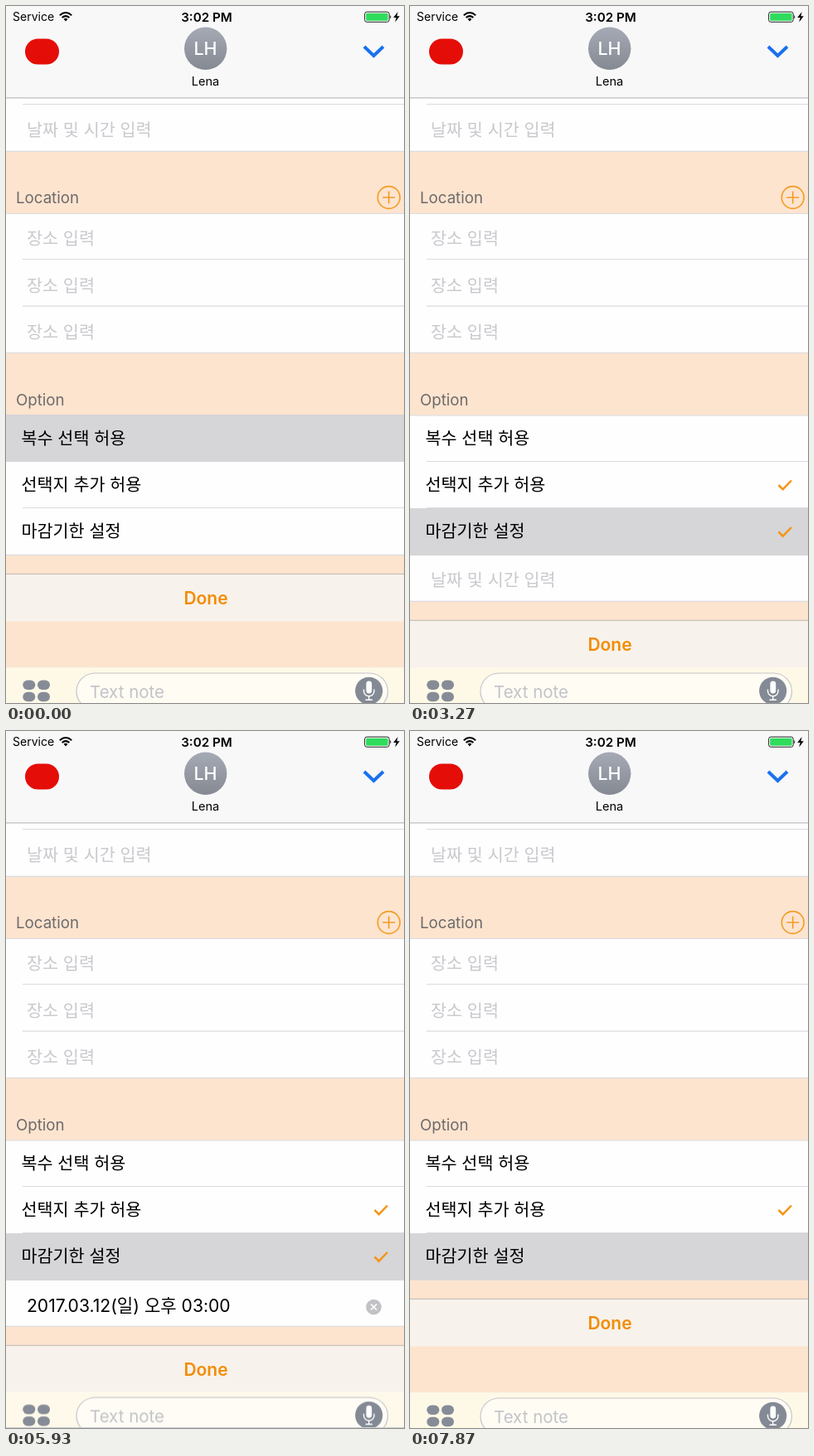
These frames come from a looping animation (480x841 px, 8 s). An HTML page:

```html
<!DOCTYPE html>
<html lang="ko">
<head>
<meta charset="utf-8">
<title>Poll options</title>
<style>
html, body { margin: 0; width: 100%; height: 100%; overflow: hidden; background: #fff; }
#stage { position: relative; width: 480px; height: 841px; overflow: hidden; }
svg { position: absolute; left: 0; top: 0; }
text, #picker { font-family: Inter, "Noto Sans CJK KR", sans-serif; }
.ko { font: 20.7px "Noto Sans CJK KR", "Noto Sans CJK JP", sans-serif; }
.hint { fill: #c9c9ce; }
.head { font-size: 18.7px; fill: #6d6a6a; }
.mid { text-anchor: middle; }
.line { stroke: #dbdbdf; stroke-width: 1.2; }
.check { fill: none; stroke: #f59516; stroke-width: 2.5; }

/* Table states */
#pick { animation: pick 8s step-end infinite; }
@keyframes pick {
  0% { transform: translateY(0); }
  3.75% { transform: translateY(56.5px); }
  16.625%, 100% { transform: translateY(112.5px); }
}
#check2 { animation: check2 8s step-end infinite; }
@keyframes check2 { 0% { opacity: 0; } 3.75%, 100% { opacity: 1; } }
#check3 { animation: check3 8s step-end infinite; }
@keyframes check3 { 0% { opacity: 0; } 16.625% { opacity: 1; } 87.5%, 100% { opacity: 0; } }
#empty { animation: empty 8s step-end infinite; }
@keyframes empty { 0% { opacity: 1; } 68.75%, 100% { opacity: 0; } }
#filled { animation: filled 8s step-end infinite; }
@keyframes filled { 0% { opacity: 0; } 68.75%, 100% { opacity: 1; } }
#tail { animation: tail 8s ease-in-out infinite; }
@keyframes tail {
  0%, 16.625% { transform: translateY(0); }
  20.375%, 87.5% { transform: translateY(56px); }
  91.25%, 100% { transform: translateY(0); }
}

/* Message bar and date picker */
#bar { animation: bar 8s cubic-bezier(.2,.8,.2,1) infinite; }
@keyframes bar {
  0%, 49.375% { transform: translateY(307px); }
  51.25%, 68.75% { transform: translateY(0); }
  75%, 100% { transform: translateY(307px); }
}
#cream { animation: cream 8s linear infinite; }
@keyframes cream { 0%, 49.375% { opacity: 1; } 51.25%, 68.75% { opacity: 0; } 75%, 100% { opacity: 1; } }
#picker {
  position: absolute; left: 0; top: 547px; width: 480px; height: 294px; color: #202124;
  background: linear-gradient(#cdd0d2, #d0d3d8 45%, #d2d4d6 75%, #d4d5c9);
  animation: rise 8s cubic-bezier(.2,.8,.2,1) infinite;
}
@keyframes rise {
  0%, 49.375% { transform: translateY(294px); }
  55.625%, 68.75% { transform: translateY(0); }
  75%, 100% { transform: translateY(294px); }
}
#done { position: absolute; left: 390px; top: 19px; font-size: 21.5px; line-height: 28px; color: #000; }
#wheel {
  position: absolute; top: 72px; width: 480px; height: 216px; perspective: 1666px;
  -webkit-mask: linear-gradient(#0005, #000b 40px, #000 85px, #0000 85px 131px, #000 131px, #000b 176px, #0005);
  mask: linear-gradient(#0005, #000b 40px, #000 85px, #0000 85px 131px, #000 131px, #000b 176px, #0005);
}
.drum { position: absolute; left: 0; top: 86px; width: 480px; height: 44px; transform-style: preserve-3d; transform: translateZ(-106.5px); }
.row { position: absolute; left: 0; height: 44px; line-height: 44px; text-align: right; white-space: pre; box-sizing: border-box; }
.drum .row { color: #85878b; backface-visibility: hidden; }
#band { position: absolute; top: 157px; width: 480px; height: 46px; overflow: hidden; box-sizing: border-box; border: solid #b3b5ba; border-width: 1.2px 0; }
.strip { position: absolute; left: 0; top: 0; width: 480px; height: 44px; }
.drum.date { animation: spin 8s cubic-bezier(.3,.2,.2,1) infinite; }
@keyframes spin {
  0%, 57.5% { transform: translateZ(-106.5px) rotateX(0deg); }
  62.5%, 100% { transform: translateZ(-106.5px) rotateX(-22.3deg); }
}
.strip.date { animation: slide 8s cubic-bezier(.3,.2,.2,1) infinite; }
@keyframes slide { 0%, 57.5% { transform: translateY(0); } 62.5%, 100% { transform: translateY(45px); } }
</style>
</head>
<body>
<div id="stage">
<svg width="480" height="841" viewBox="0 0 480 841">
  <rect width="480" height="841" fill="#fde4cf"/>

  <!-- Date and location -->
  <path d="M0 110H480V175H0zM0 250H480V418H0zM0 494H480V719H0z" fill="#fefefe"/>
  <path class="line" d="M20 118.5H480M0 175.3H480M0 250.5H480M20 305.5H480M20 362.2H480M0 418.5H480M0 494H480M20 549.5H480M20 605.5H480"/>
  <text class="ko hint" x="25" y="157">날짜 및 시간 입력</text>
  <text class="head" x="12" y="238">Location</text>
  <g fill="none" stroke="#f39b22" stroke-width="1.6">
    <circle cx="461.7" cy="231" r="13.4"/><path d="M454.2 231H469.2M461.7 223.5V238.5"/>
  </g>
  <text class="ko hint" x="25" y="288">장소 입력</text>
  <text class="ko hint" x="25" y="344.5">장소 입력</text>
  <text class="ko hint" x="25" y="400.5">장소 입력</text>

  <!-- Options -->
  <text class="head" x="12" y="481.5">Option</text>
  <rect id="pick" y="493" width="480" height="57" fill="#d6d5d8"/>
  <text class="ko" x="18.5" y="528.5">복수 선택 허용</text>
  <text class="ko" x="18.5" y="584.5">선택지 추가 허용</text>
  <text class="ko" x="18.5" y="641">마감기한 설정</text>
  <path id="check2" class="check" d="M444.5 578L449.7 583.2L460 572.5"/>
  <path id="check3" class="check" d="M444.5 634.5L449.7 639.7L460 629"/>
  <text id="empty" class="ko hint" x="25" y="700">날짜 및 시간 입력</text>
  <g id="filled">
    <text x="25" y="701" font-size="21.1">2017.03.12(일) 오후 03:00</text>
    <circle cx="443.5" cy="695" r="9.3" fill="#c2c2c6"/>
    <path d="M440 691.5l7 7m0-7l-7 7" stroke="#fff" stroke-width="1.7"/>
  </g>
  <g id="tail">
    <rect y="662" width="480" height="180" fill="#fde4cf"/>
    <path class="line" d="M0 662.3H480"/>
    <rect y="685" width="480" height="57.5" fill="#f7f2eb"/>
    <path d="M0 685.3H480" stroke="#c9c1ba" stroke-width="1.2"/>
    <text class="mid" x="241" y="722" font-size="21" font-weight="600" fill="#f28c05">Done</text>
  </g>

  <!-- Header -->
  <rect width="480" height="110.5" fill="#f8f8f9"/>
  <path d="M0 110.8H480" stroke="#bdbdc0" stroke-width="1.3"/>
  <text x="8" y="18.3" font-size="14">Service</text>
  <g fill="none" stroke="#000" stroke-width="2">
    <path d="M64.8 11.2Q72 4.8 79.2 11.2M67.6 14Q72 10.2 76.4 14"/>
  </g>
  <path d="M69.6 15.8Q72 13.8 74.4 15.8L72 18.4z"/>
  <text class="mid" x="242" y="18.5" font-size="15.2" font-weight="600">3:02 PM</text>
  <rect x="432.6" y="7.1" width="29.6" height="12.2" rx="2.6" fill="none" stroke="#222"/>
  <rect x="434.2" y="8.7" width="26.4" height="9" rx="1.2" fill="#2fdc5c"/>
  <path d="M463.3 11Q465.3 13.2 463.3 15.4z"/>
  <path d="M472.6 7L467.2 14H470.6L469.2 19.6L474.8 12.2H471.4z"/>
  <rect x="23" y="39.5" width="41" height="31" rx="15.5" fill="#e50d08"/>
  <linearGradient id="shade" x2="0" y2="1"><stop stop-color="#a5aab5"/><stop offset="1" stop-color="#858992"/></linearGradient>
  <circle cx="240.7" cy="51.3" r="25.7" fill="url(#shade)"/>
  <text class="mid" x="240.5" y="59" font-size="21.5" font-weight="500" fill="#fff">LH</text>
  <text class="mid" x="240.5" y="95.5" font-size="14.6">Lena</text>
  <path d="M432 49L443.5 60L455 49" fill="none" stroke="#1a70f0" stroke-width="4"/>

  <!-- Message bar -->
  <g id="bar">
    <rect y="491.5" width="480" height="57.5" fill="#fefefe"/>
    <rect id="cream" y="491.5" width="480" height="57.5" fill="#fef9e7"/>
    <g fill="#868c97">
      <rect x="20.3" y="506.5" width="15" height="11.4" rx="5.7"/><rect x="38" y="506.5" width="15" height="11.4" rx="5.7"/>
      <rect x="20.3" y="520.8" width="15" height="11.4" rx="5.7"/><rect x="38" y="520.8" width="15" height="11.4" rx="5.7"/>
    </g>
    <rect x="85" y="498" width="375.5" height="44" rx="22" fill="#fff" fill-opacity=".55" stroke="#c4c4ca" stroke-width="1.2"/>
    <text x="101" y="528" font-size="20.5" fill="#c3c3c8">Text note</text>
    <circle cx="437.7" cy="519.3" r="16.6" fill="#848a95"/>
    <rect x="434.4" y="507.5" width="6.8" height="15" rx="3.4" fill="#fff"/>
    <path d="M431.5 517.5V519.5A6.2 6.2 0 0 0 444 519.5V517.5M437.7 526V530M433.5 530.3H442" fill="none" stroke="#fff" stroke-width="1.4"/>
  </g>
</svg>

<div id="picker">
  <div id="done">Done</div>
  <div id="wheel"></div>
  <div id="band"></div>
</div>
</div>
<script>
const STEP = 22.3, RADIUS = 106.5, PITCH = 45;
const TODAY = '오늘';
const dates = ['8일 수', '9일 목', '10일 금', '11일 토', '12일 일', '', '14일 화', '15일 수', '16일 목']
  .map(d => d ? '3월 ' + d : TODAY);

// right and size: [on the drum, in the selection band]
const columns = [
  { name: 'date', items: dates, selected: 5, right: [223, 216], size: [25, 29] },
  { name: 'half', items: ['오전', '오후'], selected: 1, right: [284, 288], size: [25, 29] },
  { name: 'hour', items: [12, 1, 2, 3, 4, 5, 6], selected: 3, right: [338, 341], size: [26, 30] },
  { name: 'minute', items: [45, 50, 55, '00', '05', 10, 15], selected: 3, right: [417, 420], size: [26, 30] }
];

function add(parent, className, text = '') {
  const el = document.createElement('div');
  el.className = className;
  el.textContent = text;
  return parent.appendChild(el);
}

function fill(parent, kind, col, side) {
  const list = add(parent, kind + ' ' + col.name);
  col.items.forEach((item, n) => {
    const i = n - col.selected;
    const row = add(list, 'row', item);
    row.style.width = col.right[side] + 'px';
    row.style.fontSize = col.size[side] + 'px';
    if (item === TODAY) row.style.paddingRight = (side ? 21 : 29) + 'px';
    row.style.transform = side
      ? `translateY(${i * PITCH}px)`
      : `rotateX(${-i * STEP}deg) translateZ(${RADIUS}px)`;
  });
}

for (const col of columns) {
  fill(document.getElementById('wheel'), 'drum', col, 0);
  fill(document.getElementById('band'), 'strip', col, 1);
}
</script>
</body>
</html>
```
